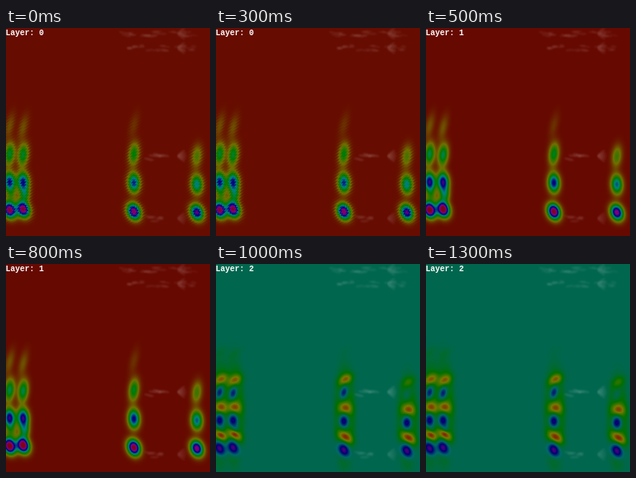
An HTML page with a canvas that plays this animation: 256 px wide and 260 px high, repeating every 1.5 s.

```html
<!DOCTYPE html>
<html lang="en">
<head>
<meta charset="utf-8">
<title>Layer heat maps</title>
<style>
html, body { margin: 0; width: 100%; height: 100%; overflow: hidden; background: #660900; }
.layer { position: absolute; left: 0; top: 0; width: 256px; height: 260px; opacity: 0; animation: show 1500ms step-end infinite; }
.layer canvas { display: block; }
.layer span { position: absolute; left: -0.5px; top: 1px; font: bold 10px/12px "Liberation Mono", "Courier New", monospace; color: #fff; white-space: pre; }
@keyframes show {
  0% { opacity: 1; }
  33.3333%, 100% { opacity: 0; }
}
</style>
</head>
<body>
<script>
const W = 256, H = 260;

// Each column is a stack of overtones that fade upwards from y.
const columns = [
  { x: 4, y: 227, gap: 35, gain: 1.05, bed: 60 },
  { x: 21, y: 226, gap: 34, gain: 1.05, bed: 110 },
  { x: 160, y: 229, gap: 36, gain: 1, bed: 0 },
  { x: 239, y: 230, gap: 35, gain: 0.87, bed: 0 }
];
const layers = [
  { base: 7, hueAt: risingHue, gain: 1, grain: 0.9 },
  { base: 5, hueAt: risingHue, gain: 1.1, grain: 0 },
  { base: 166, hueAt: mixedHue, gain: 1, grain: 0 }
];

const mix = (a, b, t) => a + (b - a) * t;
const overtones = [3, 2, 1, 0];
const peak = (col, k) => Math.max(0, 320 * col.gain - 100 * k);

function blob(dx, dy, rx, ry, lean = 0) {
  return Math.exp(-(((dx - lean * dy) / rx) ** 2) - (dy / ry) ** 2);
}

function risingHue(x, y, { base, gain }) {
  let hue = base;
  for (const col of columns) {
    const dx = x - col.x, dy = y - col.y;
    for (const k of overtones) {
      hue += gain * peak(col, k) *
        blob(dx, dy + k * col.gap, 7.6 - 0.7 * k, 9.5 + 2 * k, 0.15 - 0.12 * k);
    }
    hue += gain * col.bed * blob(dx - 2, dy + 18, 6, 9);
  }
  return Math.min(hue, 350);
}

// A green sheath, then a hot cap and a cold core for every overtone
function mixedHue(x, y, { base }) {
  let hue = base;
  for (const col of columns) {
    const top = 100 * col.gain, half = (top + 22) / 2;
    const d = ((x - col.x - 1) / 13) ** 2 + ((y - col.y + top - half) / half) ** 2;
    hue = mix(hue, 108, Math.exp(-(d ** 2)));
  }
  for (const col of columns) {
    const dx = x - col.x, dy = y - col.y;
    hue = mix(hue, 245, col.bed / 150 * blob(dx - 2, dy + 18, 5, 8));
    for (const k of overtones) {
      const force = Math.min(1, peak(col, k) / 120) ** 2;
      const up = dy + k * col.gap, lean = 0.5 - 0.45 * k;
      hue = mix(hue, 12 + 10 * k, force * blob(dx - 2, up + 13, 7.5, 7, lean));
      hue = mix(hue, 275 - 25 * k, force * blob(dx, up - 3, 7.5 - k, 9, lean / 2));
    }
  }
  return hue;
}

function channel(hue, n) {
  const k = (n + hue / 60) % 6;
  return 1 - Math.max(0, Math.min(k, 4 - k, 1));
}

function paintHeat(ctx, layer) {
  const img = ctx.createImageData(W, H);
  for (let y = 0, i = 0; y < H; y++) {
    for (let x = 0; x < W; x++) {
      const shift = layer.grain * Math.sin(1.7 * y + x);
      const hue = layer.hueAt(x + shift, y, layer);
      const v = 102 + 26 * Math.min(1, Math.abs(hue - layer.base) / 150);
      for (const n of [5, 3, 1]) img.data[i++] = v * channel(hue, n);
      img.data[i++] = 255;
    }
  }
  ctx.putImageData(img, 0, 0);
}

function random(seed) {
  return () => (seed = seed * 16807 % 2147483647) / 2147483647;
}

function paintEchoes(ctx) {
  const rnd = random(71);
  const streak = (x, y, rx, ry, tilt, alpha) => {
    ctx.fillStyle = `rgba(255,255,255,${alpha})`;
    ctx.beginPath();
    ctx.ellipse(x, y, rx, ry, tilt, 0, 2 * Math.PI);
    ctx.fill();
  };
  const group = (x, y, spread, count, alpha) => {
    for (let i = 0; i < count; i++) {
      streak(x + (rnd() - 0.5) * spread, y + (rnd() - 0.5) * 7,
        3 + rnd() * 4, 1 + rnd() * 0.8, (rnd() - 0.3) * 0.5, alpha);
    }
  };
  // Strokes that spread to the right from one tip
  const fan = (x, y, alpha) => {
    for (let a = -0.6; a <= 0.6; a += 0.3) {
      streak(x + 7 * Math.cos(a), y + 7 * Math.sin(a), 6, 1.4, a, alpha);
    }
  };
  ctx.filter = "blur(1.2px)";
  for (const y of [7, 25]) {
    group(156, y, 18, 6, 0.07);
    group(186, y, 32, 9, 0.07);
    group(222, y, 30, 7, 0.06);
    fan(214, y, 0.09);
  }
  for (const y of [161, 239]) {
    const alpha = y < 200 ? 0.11 : 0.08;
    group(190, y, 22, 6, alpha);
    fan(214, y - 1, alpha);
  }
  ctx.filter = "none";
}

layers.forEach((layer, i) => {
  const box = document.createElement("div");
  const canvas = document.createElement("canvas");
  const label = document.createElement("span");
  box.className = "layer";
  box.style.animationDelay = `${(i - 3) * 500}ms`;
  canvas.width = W;
  canvas.height = H;
  label.textContent = `Layer: ${i}`;
  const ctx = canvas.getContext("2d");
  paintHeat(ctx, layer);
  paintEchoes(ctx);
  box.append(canvas, label);
  document.body.append(box);
});
</script>
</body>
</html>
```
